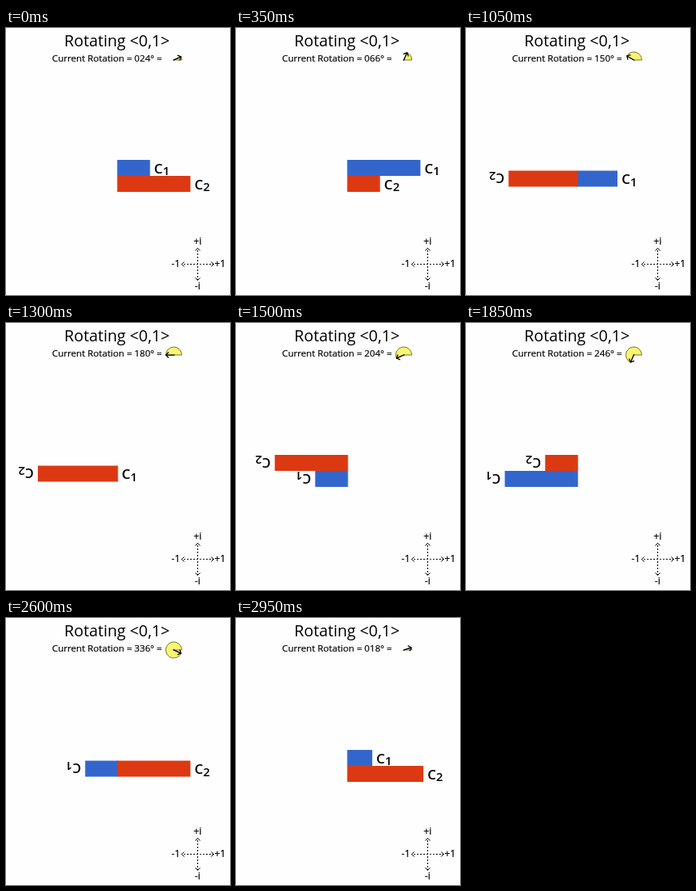
These frames come from a looping animation (281x334 px, 3 s). An HTML page:

```html
<!DOCTYPE html>
<html lang="en">
<head>
<meta charset="utf-8">
<title>Rotating a vector</title>
<style>
  html, body { margin: 0; width: 100%; height: 100%; overflow: hidden; background: #fefefe; }
  svg { display: block; width: 100%; height: 100%; }
  text { font-family: "Open Sans", "Noto Sans", sans-serif; fill: #000; white-space: pre; }
  .title { font-size: 19.8px; }
  .status { font-size: 11.65px; stroke: #000; stroke-width: .2; }
  .axis { font-size: 12.4px; stroke: #000; stroke-width: .2; }
  .label { font-size: 17px; font-weight: 600; }
  .sub { font-size: 15px; }
  .line { fill: none; stroke: #000; }
</style>
</head>
<body>
<svg viewBox="0 0 281 334">
  <text class="title" x="73" y="23">Rotating &lt;0,1&gt;</text>
  <text class="status" id="status" x="57.8" y="42"></text>

  <g transform="translate(210.5 40)">
    <path id="sector" fill="#f8f573" stroke="#74741c"/>
    <path id="needle" class="line" stroke-width="1.25" d="M-1 0H10M6.5 -3.5L10 0L6.5 3.5"/>
  </g>

  <g id="bars">
    <g id="bar1">
      <rect x="-.5" height="20" fill="#3366cc"/>
      <text class="label" y="16.5">C<tspan class="sub" dy="2.5">1</tspan></text>
    </g>
    <g id="bar2">
      <rect x="-.5" height="20" fill="#dc3912"/>
      <text class="label" y="16.5">C<tspan class="sub" dy="2.5">2</tspan></text>
    </g>
  </g>

  <g class="line">
    <path stroke-dasharray="2 2" stroke-dashoffset="1" d="M220 295.5H261M240.5 275V316"/>
    <path d="M223.5 292.5L220.5 295.5L223.5 298.5M257.5 292.5L260.5 295.5L257.5 298.5
             M237.5 278.5L240.5 275.5L243.5 278.5M237.5 312.5L240.5 315.5L243.5 312.5"/>
  </g>
  <g class="axis">
    <text x="240.3" y="271" text-anchor="middle">+i</text>
    <text x="240.3" y="327" text-anchor="middle">-i</text>
    <text x="207.5" y="299">-1</text>
    <text x="261.5" y="299">+1</text>
  </g>
</svg>
<script>
const STEP_MS = 50, STEPS = 60, START = 24, ORIGIN_X = 140, UNIT = 100;
const el = id => document.getElementById(id);

// Negative bars are turned half a circle about their own axis or the shared edge.
function placeBar(id, value, top, pivotY) {
  const bar = el(id), length = Math.abs(value) * UNIT;
  const turn = value < 0 ? ` rotate(180 0 ${pivotY - top})` : "";
  bar.setAttribute("transform", `translate(${ORIGIN_X} ${top})${turn}`);
  bar.querySelector("rect").setAttribute("width", length + 0.5);
  bar.querySelector("text").setAttribute("x", length + 5.2);
}

function render(time) {
  const step = Math.floor(time / STEP_MS) % STEPS;
  const degrees = (START + step * 360 / STEPS) % 360;
  const angle = degrees * Math.PI / 180;
  const c1 = Math.sin(angle), c2 = Math.cos(angle);

  el("status").textContent = `Current Rotation = ${String(degrees).padStart(3, "0")}° =`;

  const large = degrees > 180 ? 1 : 0;
  el("sector").setAttribute("d", degrees
    ? `M0 0H10A10 10 0 ${large} 0 ${10 * c2} ${-10 * c1}Z` : "M0 0H10");
  el("needle").setAttribute("transform", `rotate(${-degrees})`);

  const stacked = (c1 < 0) === (c2 < 0);
  const pivotY = stacked ? 185 : 188.5;
  placeBar("bar1", c1, stacked ? 165 : 178.5, pivotY);
  placeBar("bar2", c2, stacked ? 185 : 178.5, pivotY);
}

const start = performance.now();
function tick() {
  render(performance.now() - start);
  requestAnimationFrame(tick);
}
tick();
</script>
</body>
</html>
```
